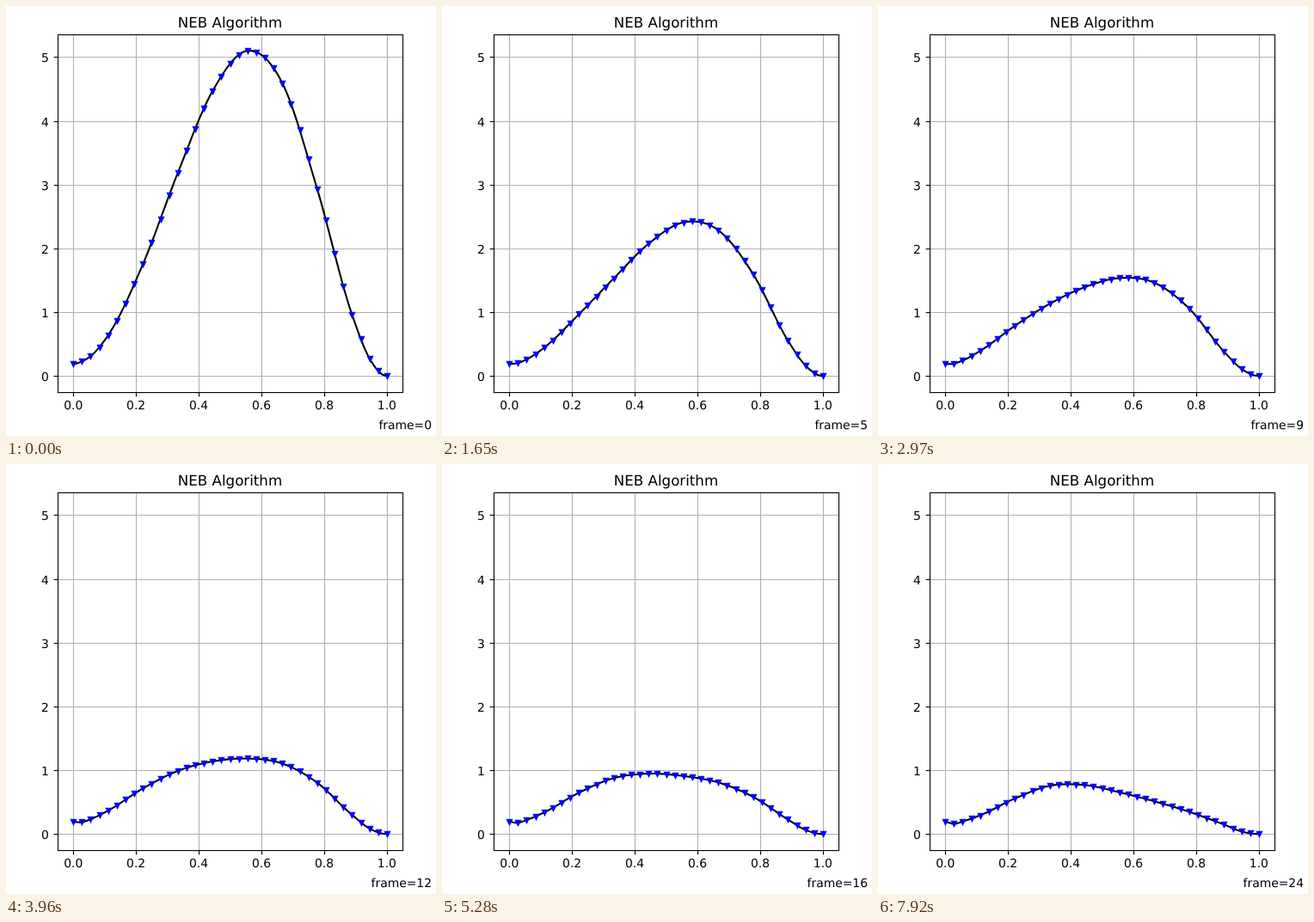
These frames come from a looping animation (500 by 500 pixels, 8 s). An HTML page:

```html
<!DOCTYPE html>
<html lang="en">
<head>
<meta charset="utf-8">
<title>NEB Algorithm</title>
<style>
  html, body { margin: 0; width: 100%; height: 100%; overflow: hidden; background: #fff; }
  svg { display: block; width: 100%; height: 100%; }
  text { font-family: "DejaVu Sans", sans-serif; font-size: 13.89px; text-rendering: geometricPrecision; }
  .title { font-size: 16.67px; }
  .grid { stroke: #b0b0b0; stroke-width: 1.11; }
  .axis { stroke: #000; stroke-width: 1.11; fill: none; }
  #curve { stroke: #000; stroke-width: 2.08; stroke-linejoin: round; stroke-linecap: square; fill: none; }
  #markers { fill: #00f; stroke: #00f; stroke-width: 1.39; stroke-linejoin: miter; }
</style>
</head>
<body>
<svg viewBox="0 0 500 500">
  <g id="axes"></g>
  <path id="curve"/>
  <path id="markers"/>
  <rect class="axis" x="60.5" y="33.5" width="401" height="416"/>
  <text class="title" x="260.5" y="25" text-anchor="middle">NEB Algorithm</text>
  <text id="counter" x="495" y="492" text-anchor="end"></text>
</svg>
<script>
const LOOP = 8000, STEP = 330, IMAGES = 36;
const BOX = { left: 60.5, right: 461.5, top: 33.5, bottom: 449.5 };

// Key images along the path: energy at the start, at iteration MID and at iteration END.
const MID = 9, END = 24;
const KEYS = [
  { image: 0, energy: [0.19, 0.19, 0.19] },
  { image: 1, energy: [0.228, 0.193, 0.158] },
  { image: 2, energy: [0.312, 0.243, 0.197] },
  { image: 4, energy: [0.638, 0.392, 0.292] },
  { image: 8, energy: [1.755, 0.787, 0.557] },
  { image: 12, energy: [3.185, 1.132, 0.755] },
  { image: 16, energy: [4.47, 1.392, 0.767] },
  { image: 20, energy: [5.1, 1.535, 0.653] },
  { image: 24, energy: [4.592, 1.462, 0.512] },
  { image: 28, energy: [2.932, 1.057, 0.347] },
  { image: 32, energy: [0.962, 0.382, 0.147] },
  { image: 34, energy: [0.277, 0.112, 0.039] },
  { image: 36, energy: [0, 0, 0] }
];

const $ = id => document.getElementById(id);
const toX = v => 78.2 + 364.7 * v;
const toY = v => 430.2 - 74.15 * v;
const snap = p => Math.round(p) + 0.5;

function drawAxes() {
  const line = (cls, x1, y1, x2, y2) =>
    `<line class="${cls}" x1="${x1}" y1="${y1}" x2="${x2}" y2="${y2}"/>`;
  let out = "";
  for (let i = 0; i <= 5; i++) {
    const x = snap(toX(i / 5)), y = snap(toY(i));
    out += line("grid", x, BOX.top, x, BOX.bottom)
      + line("grid", BOX.left, y, BOX.right, y)
      + line("axis", x, BOX.bottom, x, BOX.bottom + 4.86)
      + line("axis", BOX.left, y, BOX.left - 4.86, y)
      + `<text x="${toX(i / 5)}" y="469" text-anchor="middle">${(i / 5).toFixed(1)}</text>`
      + `<text x="49.9" y="${y + 5.5}" text-anchor="end">${i}</text>`;
  }
  $("axes").innerHTML = out;
}

// Exponential decay running from 1 at the start to 0 at iteration END.
function decay(rate, n) {
  const rest = Math.exp(-rate * END);
  return (Math.exp(-rate * n) - rest) / (1 - rest);
}

// Each image relaxes as a fast plus a slow decay; the two rates spread apart towards the left.
function energyAt({ image, energy: [first, mid, last] }, n) {
  const spread = Math.max(0, 0.5 - image / IMAGES);
  const fast = 0.25 + 0.4 * spread, slow = 0.1 - 0.18 * spread;
  const drop = first - last, slowMid = decay(slow, MID);
  const fastPart = (mid - last - drop * slowMid) / (decay(fast, MID) - slowMid);
  return last + fastPart * decay(fast, n) + (drop - fastPart) * decay(slow, n);
}

// Cubic Hermite interpolation with three-point tangents and level ends.
function spline(xs, ys) {
  const gap = i => xs[i + 1] - xs[i];
  const slope = i => (ys[i + 1] - ys[i]) / gap(i);
  const end = xs.length - 1;
  const tangents = xs.map((_, i) => i === 0 || i === end ? 0 :
    (slope(i - 1) * gap(i) + slope(i) * gap(i - 1)) / (gap(i - 1) + gap(i)));
  return x => {
    let i = 0;
    while (i < end - 1 && x > xs[i + 1]) i++;
    const h = gap(i), t = (x - xs[i]) / h, u = 1 - t;
    return u * u * ((1 + 2 * t) * ys[i] + t * h * tangents[i])
      + t * t * ((3 - 2 * t) * ys[i + 1] - u * h * tangents[i + 1]);
  };
}

function draw(n) {
  const energy = spline(KEYS.map(key => key.image), KEYS.map(key => energyAt(key, n)));
  const points = [];
  for (let i = 0; i <= IMAGES; i += 0.25) {
    points.push(`${toX(i / IMAGES).toFixed(2)},${toY(energy(i)).toFixed(2)}`);
  }
  let marks = "";
  for (let i = 0; i <= IMAGES; i++) {
    marks += `M${snap(toX(i / IMAGES)) - 3},${snap(toY(energy(i))) - 3}h6l-3,6z`;
  }
  $("curve").setAttribute("d", "M" + points.join("L"));
  $("markers").setAttribute("d", marks);
  $("counter").textContent = "frame=" + n;
}

drawAxes();
let shown = 0;
draw(shown);
const start = performance.now();
function tick() {
  const n = Math.floor(((performance.now() - start) % LOOP) / STEP);
  if (n !== shown) draw(shown = n);
  requestAnimationFrame(tick);
}
requestAnimationFrame(tick);
</script>
</body>
</html>
```
